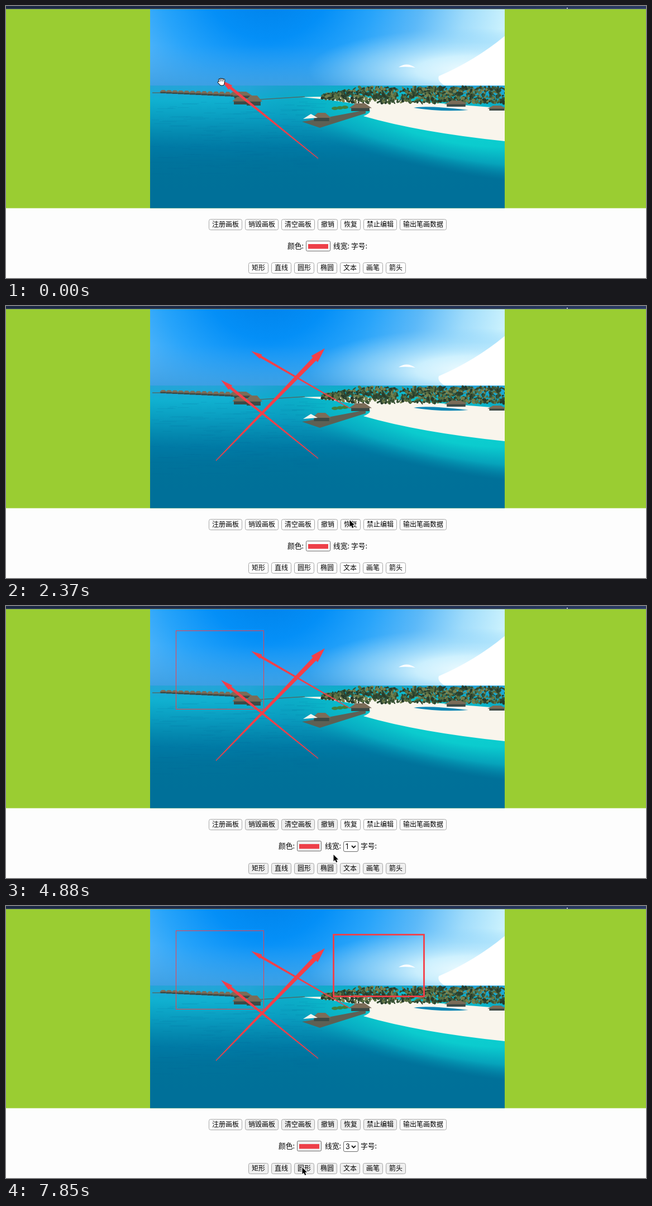
An HTML page with a canvas for the animation above (8 s loop, 1146x489 px).

```html
<!DOCTYPE html>
<html lang="zh">
<head>
<meta charset="utf-8">
<title>画板</title>
<style>
html, body { margin: 0; width: 100%; height: 100%; overflow: hidden; background: #fdfdfd; }
canvas { display: block; }
</style>
</head>
<body>
<canvas id="stage" width="1146" height="489"></canvas>
<script>
const stage = document.getElementById('stage');
const ctx = stage.getContext('2d');
const W = 1146, H = 489, LOOP = 8000, STEP = 148, LAST = 53, LAG = 0.42;
const RED = '#f43f48';
const CJK = '"Noto Sans CJK SC", "Noto Sans CJK", sans-serif';
const LATIN = 'Inter, "Noto Sans", sans-serif';
const UI_CHANGE = 17, MENU_OPEN = 36, MENU_CLOSE = 42;

const strokes = [
  { draw: drawArrow, from: [616, 184], to: [439, 81], start: 4, end: 8.4 },
  { draw: drawArrow, from: [376, 278], to: [571, 76], start: 11, end: 14.4 },
  { draw: drawRect, from: [304, 44], to: [461, 185], start: 24.5, end: 28.6, width: 1 },
  { draw: drawRect, from: [586, 51], to: [748, 162], start: 44.7, end: 48.8, width: 2.8 }
];
const key = (n, x, y) => ({ n, at: [x, y] });
const path = [
  key(0, 386, 136), key(3, 629, 200),
  key(16, 615, 384), key(18, 452, 466), key(22, 354, 92), key(24, 304, 44),
  key(32, 560, 461), key(33, 586, 446), key(35, 617, 432), key(41, 625, 470),
  key(52, 411, 466), key(LAST, 530, 469),
  ...strokes.flatMap(s => [key(s.start, ...s.from), key(s.end, ...s.to)])
].sort((a, b) => a.n - b.n);

const clamp = (v, lo, hi) => Math.min(hi, Math.max(lo, v));
const ease = k => k * k * (3 - 2 * k);

function pointerAt(n) {
  const i = Math.max(1, path.findIndex(p => p.n >= n));
  const a = path[i - 1], b = path[i];
  const k = ease((n - a.n) / (b.n - a.n));
  return a.at.map((v, axis) => v + (b.at[axis] - v) * k);
}

function seeded(seed) {
  return () => (seed = seed * 16807 % 2147483647) / 2147483647;
}

function fade(gradient, ...colors) {
  colors.forEach((color, i) => gradient.addColorStop(i / (colors.length - 1), color));
  return gradient;
}

function fillPath(c, d, fill) {
  c.fillStyle = fill;
  c.fill(new Path2D(d));
}

// Soft round patch of colour, stretched and turned
function glow(c, x, y, rx, ry, turn, ...colors) {
  c.save();
  c.translate(x, y);
  c.rotate(turn);
  c.scale(rx, ry);
  c.fillStyle = fade(c.createRadialGradient(0, 0, 0, 0, 0, 1), ...colors);
  c.fillRect(-1, -1, 2, 2);
  c.restore();
}

function hut(c, x, y, w, h) {
  c.fillStyle = '#3c4a46';
  c.fillRect(x + w * .1, y + h * .5, w * .8, h * .5);
  c.fillStyle = '#7b6c58';
  c.beginPath();
  c.moveTo(x, y + h * .6);
  c.lineTo(x + w * .3, y);
  c.lineTo(x + w * .7, y);
  c.lineTo(x + w, y + h * .6);
  c.fill();
}

function paintSky(c) {
  c.fillStyle = fade(c.createRadialGradient(470, -60, 40, 470, -60, 440),
    '#0082ea', '#048ff7', '#28a4fa', '#5cb9f8', '#a0dcfb', '#cff4fe');
  c.fillRect(258, 6, 635, 140);
  c.fillStyle = fade(c.createLinearGradient(0, 70, 0, 146), 'rgba(58,160,236,0)', '#3c9fe2');
  c.fillRect(258, 70, 635, 76);
  glow(c, 830, 115, 290, 75, 0, '#effbff', 'rgba(214,245,255,.9)', 'rgba(160,220,251,.6)', 'rgba(130,205,250,0)');
  fillPath(c, 'M893 54 Q840 98 775 126 Q770 138 800 150 H893 Z', '#fff');
  fillPath(c, 'M703 110 Q718 100 733 111 Q718 108 703 110 Z', '#fff');
}

function paintSea(c) {
  c.save();
  c.beginPath();
  c.rect(258, 143, 635, 221);
  c.clip();
  c.fillStyle = fade(c.createLinearGradient(0, 143, 0, 335),
    '#25a4d9', '#10b0d0', '#0a9fc2', '#058cb2', '#007aa5', '#00739c', '#007199', '#007099');
  c.fillRect(258, 143, 635, 221);
  glow(c, 800, 218, 370, 80, .19, '#0ccfd0', '#0bcbce', 'rgba(8,180,198,.75)', 'rgba(4,145,176,0)');
  const rnd = seeded(7);
  c.fillStyle = 'rgba(0,100,150,.14)';
  for (let i = 0; i < 170; i++) c.fillRect(258 + rnd() * 290, 172 + rnd() * 130, 10 + rnd() * 36, 1);
  c.restore();
}

function paintIsland(c) {
  fillPath(c, 'M530 164 Q620 160 740 172 L893 184 V243 Q740 227 640 198 Q690 178 530 164 Z', '#f9f5ec');
  const rnd = seeded(11);
  const greens = ['#2c4530', '#586f42', '#3a5236', '#75804f', '#273a2b'];
  for (let i = 0; i < 900; i++) {
    const along = rnd(), rise = Math.min(1, along * 5);
    c.fillStyle = greens[i % greens.length];
    c.beginPath();
    c.ellipse(566 + along * 330, 161 - 15 * rise + rnd() * (5 + 23 * rise),
      1.5 + rnd() * 3, 1 + rnd() * 1.8, rnd() * 3, 0, 7);
    c.fill();
  }
  fillPath(c, 'M730 183 Q750 178 828 187 Q780 191 730 183 Z', '#0c86b4');
  hut(c, 785, 170, 42, 11);
  hut(c, 862, 179, 34, 9);
}

function paintHuts(c) {
  c.strokeStyle = '#4d6c6c';
  c.lineWidth = 1.5;
  c.stroke(new Path2D('M262 156 H276 M455 168 L535 163'));
  for (let i = 0; i < 15; i++) hut(c, 275 + i * 10.5, 151 + i * .3, 13, 6 + i * .2);
  hut(c, 405, 154, 36, 12);
  hut(c, 405, 163, 30, 14);
  hut(c, 428, 161, 31, 18);

  fillPath(c, 'M530 208 L566 202 L644 187 V193 L562 219 Z', '#5d6054');
  hut(c, 548, 192, 34, 15);
  hut(c, 614, 175, 41, 14);
  fillPath(c, 'M532 203 L546 194 L558 201 Z', '#f2f5ef');
  c.fillStyle = '#437f3e';
  for (let i = 0; i < 3; i++) {
    c.beginPath();
    c.ellipse(589 + i * 9, 184 - i, 6, 3, 0, 0, 7);
    c.fill();
  }
}

function paintBackdrop() {
  const layer = document.createElement('canvas');
  layer.width = W;
  layer.height = H;
  const c = layer.getContext('2d');
  c.fillStyle = '#fdfdfd';
  c.fillRect(0, 0, W, H);
  c.fillStyle = '#9acd32';
  c.fillRect(0, 5.5, W, 358);
  c.fillStyle = fade(c.createLinearGradient(0, 0, W, 0), '#1d2a45', '#1e2c4b', '#2b3c64');
  c.fillRect(0, 0, W, 5.5);
  c.fillStyle = '#b9c3d3';
  c.fillRect(1004, 3, 2, 2);
  c.beginPath();
  c.rect(258, 6, 635, 357.5);
  c.clip();
  [paintSky, paintSea, paintIsland, paintHuts].forEach(paint => paint(c));
  return layer;
}

function text(str, x, y, size, family = CJK) {
  ctx.font = `${size}px ${family}`;
  ctx.fillStyle = '#000';
  ctx.fillText(str, x, y);
}

function box(x, y, w, h, r, fill, border) {
  ctx.beginPath();
  ctx.roundRect(x, y, w, h, r);
  ctx.fillStyle = fill;
  ctx.fill();
  if (border) outline(border, 1);
}

function outline(color, width, shape) {
  ctx.strokeStyle = color;
  ctx.lineWidth = width;
  shape ? ctx.stroke(new Path2D(shape)) : ctx.stroke();
}

function buttonRow(labels, x, y, isGray) {
  labels.split(' ').forEach((label, i) => {
    const w = label.length * 12 + 12.4;
    box(Math.round(x) + .5, y + .5, Math.round(w) - 1, 19, 3, isGray(i) ? '#efefef' : '#fefefe', '#a5a5a5');
    text(label, Math.round(x) + 6, y + 14, 12);
    x += w + 4.6;
  });
}

function drawControls(n) {
  const active = n >= UI_CHANGE;
  const lastGray = 2 + [25, MENU_CLOSE, 49].filter(step => n >= step).length;
  buttonRow('注册画板 销毁画板 清空画板 撤销 恢复 禁止编辑 输出笔画数据', 363, 383,
    i => active && i > 0 && i <= lastGray);
  buttonRow('矩形 直线 圆形 椭圆 文本 画笔 箭头', 434, active ? 462 : 461, () => active);

  const x = active ? 488 : 504;
  text('颜色:', x, 436, 12.8);
  box(x + 33.5, 422.5, 43, 18, 2, active ? '#efefef' : '#fefefe', '#6a6a6a');
  ctx.fillStyle = '#ee3f48';
  ctx.fillRect(x + 37, 428, 36, 8.5);
  if (!active) {
    text('线宽: 字号:', 586, 436, 12.8);
    return;
  }
  text('线宽:', 571, 436, 12.8);
  text('字号:', 635, 436, 12.8);
  box(604.5, 423.5, 26, 18, 2.5, '#fff', '#6a6a6a');
  text(n >= MENU_CLOSE ? '3' : '1', 608, 437, 12.5, LATIN);
  outline('#111', 1.8, 'M619 431 l3.5 3.5 l3.5 -3.5');
}

function drawMenu() {
  ctx.save();
  ctx.shadowColor = 'rgba(0,0,0,.28)';
  ctx.shadowBlur = 7;
  ctx.shadowOffsetY = 2;
  box(596, 417, 44, 100, 5, '#e5e7e6');
  ctx.restore();
  outline('#222', 1.6, 'M604.5 432.5 l2.5 3.5 l5 -8');
  for (let i = 0; i < 4; i++) text(String(i + 1), 617, 436.5 + i * 19.7, 12.3, LATIN);
}

// Tapered arrow whose head lengthens and opens with its length
function drawArrow([x0, y0], [x1, y1]) {
  const length = Math.hypot(x1 - x0, y1 - y0);
  if (length < 3) return;
  const size = Math.max(125, length);
  const edge = size * .1, spread = size * .06 * Math.PI / 180;
  const neck = length - edge * Math.cos(spread), half = edge * Math.sin(spread);
  ctx.save();
  ctx.translate(x0, y0);
  ctx.rotate(Math.atan2(y1 - y0, x1 - x0));
  ctx.beginPath();
  ctx.moveTo(0, .6);
  for (const side of [1, -1]) {
    const wing = [[neck, half / 2], [neck, half], [length, 0]];
    if (side < 0) wing.reverse();
    wing.forEach(([x, y]) => ctx.lineTo(x, y * side));
  }
  ctx.lineTo(0, -.6);
  ctx.fillStyle = RED;
  ctx.fill();
  ctx.restore();
}

function drawRect([x0, y0], [x1, y1], width) {
  ctx.strokeStyle = RED;
  ctx.lineWidth = width;
  ctx.strokeRect(x0 + .5, y0 + .5, x1 - x0, y1 - y0);
}

function drawStrokes(n) {
  drawArrow([559, 274], [385, 133]);
  for (const s of strokes) {
    if (n > s.start) s.draw(s.from, pointerAt(clamp(n - LAG, s.start, s.end)), s.width);
  }
}

function drawHand() {
  ctx.lineCap = 'round';
  for (const [color, grow] of [['#111', 1], ['#fff', 0]]) {
    ctx.fillStyle = color;
    ctx.beginPath();
    ctx.ellipse(.5, 3, 4 + grow, 3.6 + grow, 0, 0, 7);
    ctx.fill();
    ctx.beginPath();
    for (let i = 0; i < 4; i++) {
      ctx.moveTo(i * 2.2 - 2.8, 2);
      ctx.lineTo(i * 2.8 - 4, Math.abs(i - 1.4) - 5);
    }
    ctx.moveTo(-2.5, 4);
    ctx.lineTo(-5.5, 1);
    outline(color, 1.8 + 2 * grow);
  }
}

function drawPointer() {
  const shape = 'M.5 1 V13 L3.2 10.5 L5.2 15 L7.4 14 L5.4 9.7 H9 Z';
  outline('#fff', 2, shape);
  fillPath(ctx, shape, '#000');
}

function drawCursor(n) {
  const dragging = strokes.some(s => n >= s.start && n < s.end + 1);
  ctx.save();
  ctx.translate(...pointerAt(n));
  n < 16 || dragging ? drawHand() : drawPointer();
  ctx.restore();
}

const backdrop = paintBackdrop();

function draw(n) {
  ctx.drawImage(backdrop, 0, 0);
  drawControls(n);
  drawStrokes(n);
  if (n >= MENU_OPEN && n < MENU_CLOSE) drawMenu();
  drawCursor(n);
}

const begin = performance.now();
function tick() {
  const t = Math.max(0, performance.now() - begin) % LOOP;
  draw(Math.min(LAST, Math.floor((t + 10) / STEP)));
  requestAnimationFrame(tick);
}
tick();
</script>
</body>
</html>
```
